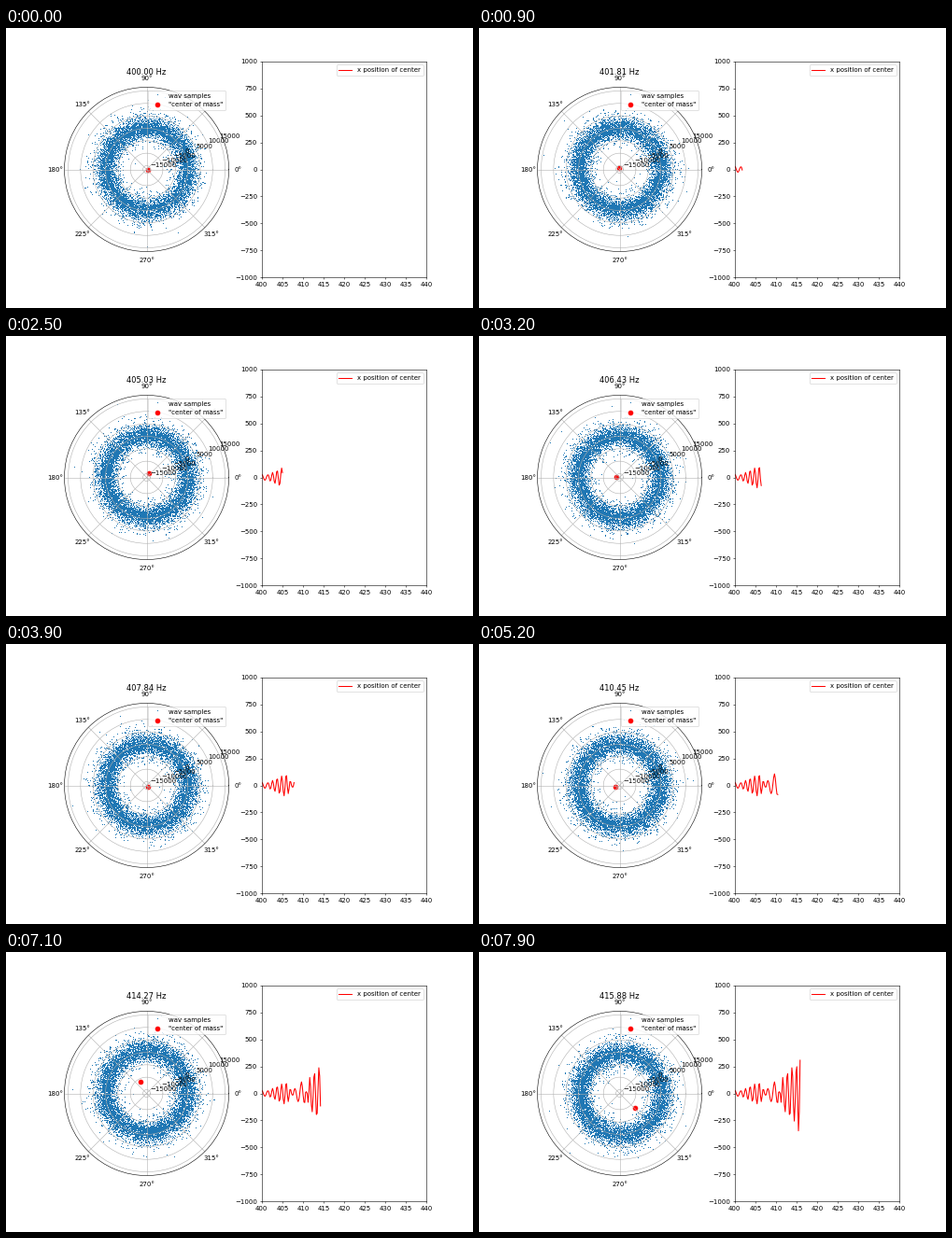
A matplotlib script that plays this animation: 500 px wide and 300 px high, repeating every 8000 ms.

```python
import matplotlib.pyplot as plt
import numpy as np
from matplotlib.animation import FuncAnimation

FRAMES = 80
R_MAX = 16500
BASE, SPAN = 400, 40
COUNT = 9500

offset = np.arange(FRAMES) * SPAN / 199
freqs = BASE + offset

# The center of mass circles the origin: (Hz above base, turns made, radius)
keys = np.array([
    (0, 0, 28), (1.5, 1, 25), (5.95, 5, 108), (7.4, 6.43, 14),
    (7.97, 7, 45), (9.65, 8, 107), (10.45, 8.55, 90), (10.85, 9, 15),
    (11.65, 10, 148), (13.92, 12, 250), (15, 13, 265), (16, 14, 445)])
turns, radius = (np.interp(offset, keys[:, 0], keys[:, k]) for k in (1, 2))
center = radius * np.exp(2j * np.pi * turns)

# Noise standing in for the recording, a little stronger on the positive side
rng = np.random.default_rng(4)
times = rng.uniform(0, 1.9, COUNT)
noise = rng.normal(0, 1950, COUNT) * np.exp(rng.normal(0, 0.3, COUNT))
noise[noise > 0] *= 1.25

fig = plt.figure(figsize=(10, 6), dpi=50)

polar = fig.add_subplot(121, projection="polar")
samples, = polar.plot([], [], ",", color="C0", zorder=1, label="wav samples")
dot = polar.scatter([0], [-R_MAX], s=50, color="red", zorder=1.2,
                    label='"center of mass"')
polar.set_ylim(-R_MAX, R_MAX)
polar.set_yticks(range(-15000, 15001, 5000))
polar.set_rlabel_position(22.5)
title = polar.set_title("", y=1.05)
polar.legend(loc="upper right")

graph = fig.add_subplot(122)
trace, = graph.plot([], [], "r", lw=1.5, label="x position of center")
graph.set_xlim(BASE, BASE + SPAN)
graph.set_ylim(-1000, 1000)
graph.set_xticks(range(BASE, BASE + SPAN + 1, 5))
graph.set_yticks(range(-1000, 1001, 250))
graph.legend(loc="upper right")


def update(i):
    theta = 2 * np.pi * freqs[i] * times % (2 * np.pi)
    # A tone of this strength pulls the ring toward the center of mass
    tone = 2 * np.real(center[i] * np.exp(-1j * theta))
    samples.set_data(theta, np.clip(noise + tone, -15000, 15000))
    dot.set_offsets([[np.angle(center[i]), 20 * abs(center[i]) - R_MAX]])
    trace.set_data(freqs[:i + 1], center.real[:i + 1])
    title.set_text(f"{freqs[i]:.2f} Hz")
    return samples, dot, trace, title


anim = FuncAnimation(fig, update, frames=FRAMES, interval=100, repeat=True)
plt.show()
```
